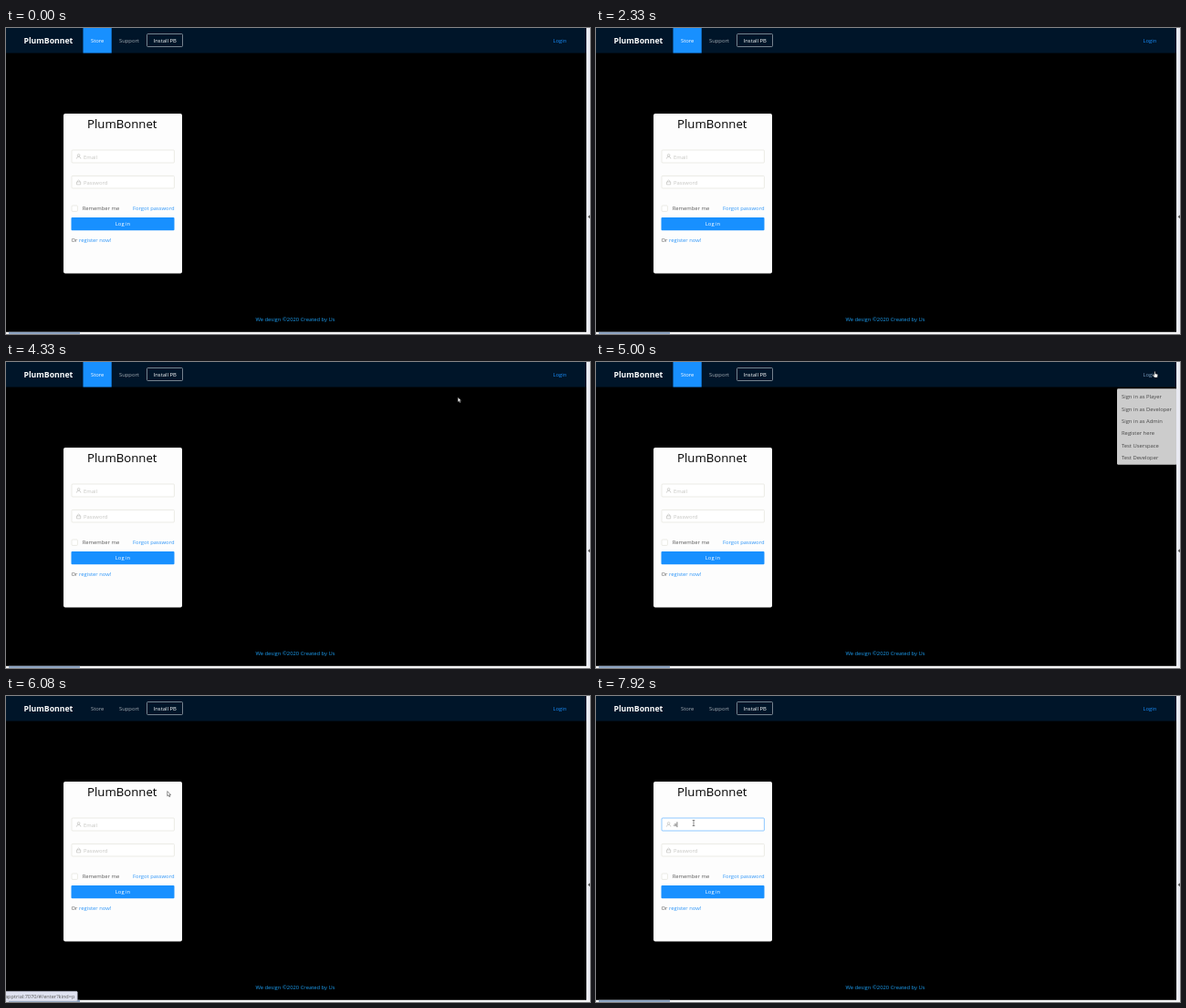
Write an HTML page that moves like this. It is 640 px wide and 336 px high and loops after 8000 ms.

```html
<!DOCTYPE html>
<html lang="en">
<head>
<meta charset="utf-8">
<title>Login page</title>
<style>
html, body { margin: 0; width: 100%; height: 100%; overflow: hidden; background: #000; }
svg { display: block; width: 100vw; height: 100vh; }
text { font: 5.85px "Open Sans", "Noto Sans", sans-serif; }
.brand { font-size: 8.7px; font-weight: 700; fill: #fff; }
.title { font-size: 13.2px; fill: #000; }
.mid { text-anchor: middle; }
.end { text-anchor: end; }
.white { fill: #fff; }
.muted { fill: #a6adb4; }
.body { fill: #595959; }
.link { fill: #2a94f8; }
.hint { fill: #c4c4c0; }
.field { fill: #fff; stroke: #e2e2dc; stroke-width: .7; }
.icon { fill: none; stroke: #b8b8b4; stroke-width: .6; }
</style>
</head>
<body>
<svg viewBox="0 0 640 336">
  <rect width="640" height="336"/>
  <rect width="636" height="27.5" fill="#001529"/>
  <text class="brand" x="19.5" y="17">PlumBonnet</text>
  <rect id="active" x="84.5" width="31.2" height="27.5" fill="#1890ff"/>
  <text id="store" x="93" y="16.2">Store</text>
  <text class="muted" x="124" y="16.2">Support</text>
  <rect x="154.5" y="6.5" width="39" height="14" rx="1" fill="none" stroke="#a9b2ba" stroke-width=".7"/>
  <text class="white mid" x="174.2" y="16.2">Install PB</text>
  <text id="login" x="599.5" y="16.2">Login</text>

  <rect x="63" y="94" width="130" height="175.5" rx="2" fill="#fdfdfd"/>
  <text class="title mid" x="127.3" y="109.8">PlumBonnet</text>
  <rect id="email" class="field" x="72" y="134" width="112.4" height="14" rx="1"/>
  <g class="icon">
    <circle cx="79.6" cy="139.8" r="1.3"/>
    <path d="M77.3 143.6q.3-2.3 2.3-2.4 2 .1 2.3 2.4"/>
  </g>
  <text id="hint" class="hint" x="85" y="143.5">Email</text>
  <text id="typed" class="body" x="85" y="143.4">a</text>
  <path id="caret" stroke="#222" stroke-width=".6"/>
  <rect class="field" x="72" y="162.4" width="112.4" height="13.6" rx="1"/>
  <path class="icon" d="M77.5 169h4.2v2.9h-4.2zM78.4 169v-1.1q1.2-1.8 2.4 0v1.1"/>
  <text class="hint" x="85" y="171.7">Password</text>
  <rect class="field" x="72" y="195" width="6.4" height="6.4" rx="1"/>
  <text class="body" x="83.7" y="200.2">Remember me</text>
  <text class="link end" x="184.5" y="200.2">Forgot password</text>
  <rect x="71.5" y="208" width="113" height="14.2" rx="1" fill="#1890ff"/>
  <text class="white mid" x="128" y="217.3">Log in</text>
  <text class="body" x="71.5" y="235">Or <tspan class="link">register now!</tspan></text>
  <text class="mid" x="317" y="322.2" fill="#1c9df0">We design ©2020 Created by Us</text>

  <g id="menu">
    <rect x="571" width="65.5" height="87" rx="1.4" fill="#fff"/>
  </g>

  <rect x="636" width="4" height="336" fill="#e9eaf2"/>
  <path d="M637.6 207.3l2.4-2v4z" fill="#555"/>
  <rect y="333.8" width="640" height="2.2" fill="#f4f4f6"/>
  <rect x="3" y="333.8" width="78" height="2.2" fill="#8fa6c4"/>
  <g id="status">
    <rect x="-3" y="324.3" width="81.2" height="10.8" rx="1" fill="#dfe2f0" stroke="#b4b8c8" stroke-width=".6"/>
    <text class="body" x="-1" y="331.8" style="font-size:5.6px">apptrial:7070/#/enter?kind=p</text>
  </g>

  <g id="cursor" stroke-linejoin="round">
    <path id="arrow" d="M0 0v5.2l1.2-1 .9 1.9 1-.5-.9-1.8h1.6z" fill="#fff" stroke="#222" stroke-width=".5"/>
    <path id="hand" d="M-.6-3.3q.6-.7 1.1 0v2.1l2.3.6q.5.2.4.8l-.5 2.9h-3.1l-2-2.7q.1-.8.9-.4l.9.6z" fill="#fff" stroke="#222" stroke-width=".5"/>
    <path id="beam" d="M-1.3-3H1.3M0-3V3M-1.3 3H1.3" fill="none" stroke="#444" stroke-width=".6"/>
  </g>
</svg>
<script>
const LOOP = 8000, STEP = 1000 / 12;
const $ = id => document.getElementById(id);
const set = (id, attrs) => { for (const k in attrs) $(id).setAttribute(k, attrs[k]); };
const show = (id, on) => set(id, { visibility: on ? "visible" : "hidden" });
const ramp = (t, from, to) => Math.min(1, Math.max(0, (t - from) / (to - from)));
const smooth = p => p * p * (3 - 2 * p);

["Sign in as Player", "Sign in as Developer", "Sign in as Admin", "Register here", "Test Userspace", "Test Developer"]
  .forEach((label, i) => {
    const item = document.createElementNS("http://www.w3.org/2000/svg", "text");
    item.textContent = label;
    item.setAttribute("class", "body");
    item.setAttribute("x", 576);
    item.setAttribute("y", 11.4 + i * 13.95);
    $("menu").append(item);
  });

// time, x, y
const path = [
  [2500, 640, 150], [3080, 205, 79], [3300, 205, 79], [4170, 470, 44],
  [4780, 612.5, 14], [5200, 612.5, 14], [5480, 596.5, 37], [5830, 596.5, 37],
  [6080, 176.8, 104.6], [6350, 165, 118], [6900, 118, 137], [7250, 107, 139.5], [LOOP, 107, 139.5]
];

function pointer(t) {
  const i = Math.max(1, path.findIndex(p => p[0] >= t));
  const [a, b] = [path[i - 1], path[i]];
  const p = smooth(ramp(t, a[0], b[0]));
  return [a[1] + (b[1] - a[1]) * p, a[2] + (b[2] - a[2]) * p];
}

function update(t) {
  const [x, y] = pointer(t);
  const open = 1 - (1 - ramp(t, 4945, 5145)) ** 5;
  const close = ramp(t, 5840, 6040) ** 3;
  const shown = open * (1 - close);
  set("menu", { opacity: shown, transform: `translate(0 29.3) scale(1 ${0.8 + 0.2 * shown})` });

  const left = ramp(t, 5860, 6020);
  set("active", { opacity: 1 - left });
  set("store", { fill: left < .5 ? "#fff" : "#a6adb4" });

  const overLogin = t > 4700 && t < 5300;
  set("login", { fill: overLogin ? "#7d9fc0" : "#1890ff" });

  const focused = t >= 7400, typed = t >= 7740;
  set("email", { style: focused ? "stroke:#5fb2ff" : "" });
  show("hint", !typed);
  show("typed", typed);
  show("caret", focused);
  set("caret", { d: `M${typed ? 88.9 : 85} 138.3v5.8` });
  show("status", t >= 5560 && t < 6480);

  const hand = t >= 4700 && t < 5880;
  const beam = t >= 6860;
  const present = t >= 2500;
  set("cursor", { transform: `translate(${x} ${y})` });
  show("arrow", present && !hand && !beam);
  show("hand", present && hand);
  show("beam", present && beam);
}

const start = performance.now();
function tick() {
  const t = (performance.now() - start) % LOOP;
  update(Math.floor((t + 4) / STEP) * STEP);
  requestAnimationFrame(tick);
}
tick();
</script>
</body>
</html>
```
